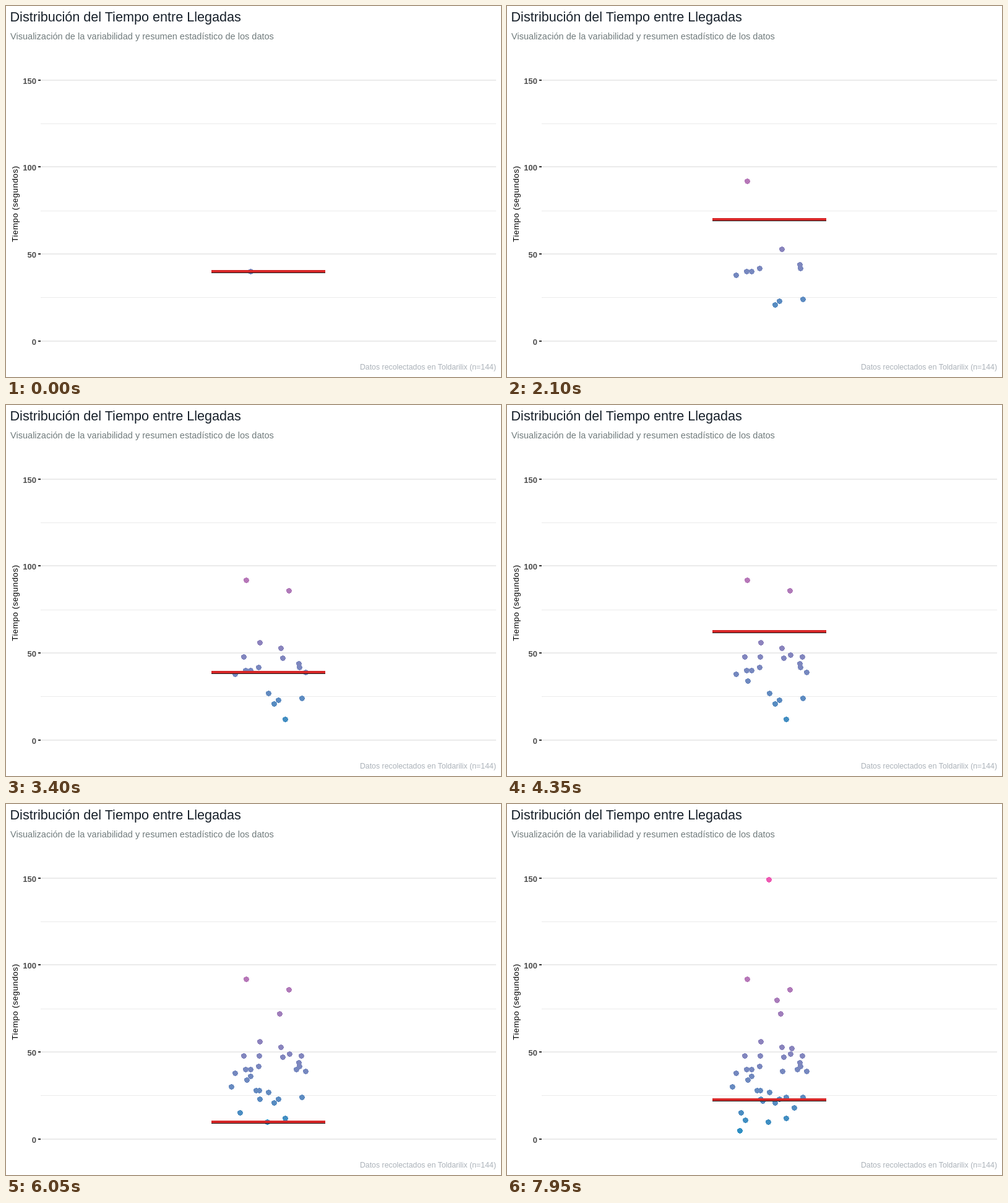
An HTML page for the animation above (8000 ms loop, 800 by 600 pixels).

```html
<!DOCTYPE html>
<html lang="es">
<head>
<meta charset="utf-8">
<title>Distribución del Tiempo entre Llegadas</title>
<style>
  html, body { margin: 0; width: 100%; height: 100%; overflow: hidden; background: #fff; }
  svg { display: block; width: 800px; height: 600px; font-family: "Liberation Sans", Arial, sans-serif; }
  rect, circle { shape-rendering: crispEdges; }
  .title { font-size: 21.6px; fill: #17202a; }
  .subtitle { font-size: 14.55px; fill: #707b7c; }
  .caption { font-size: 12.33px; fill: #abb2b9; text-anchor: end; }
  .axis { font-size: 13.4px; letter-spacing: .5px; text-anchor: middle; }
  .tick { font-size: 13px; font-weight: bold; fill: #4d4d4d; text-anchor: end; }
</style>
</head>
<body>
<svg viewBox="0 0 800 600">
  <text class="title" x="6.5" y="25">Distribución del Tiempo entre Llegadas</text>
  <text class="subtitle" x="7" y="54">Visualización de la variabilidad y resumen estadístico de los datos</text>
  <text class="caption" x="792" y="588">Datos recolectados en Toldarilix (n=144)</text>
  <text class="axis" transform="translate(19 320) rotate(-90)">Tiempo (segundos)</text>
  <g id="grid"></g>
  <g id="dots"></g>
  <g id="bar">
    <rect x="332" y="-2" width="184" height="4" fill="#d62728"/>
    <rect x="332" y="2" width="184" height="1" fill="#1c1c1c"/>
  </g>
</svg>
<script>
const FRAME_MS = 50, FRAMES = 160;
const FRAMES_PER_ARRIVAL = 575 / 143;

// Seconds between arrivals: the key points the bar travels through
const seconds = [40, 42, 21, 42, 40, 44, 24, 53, 23, 38, 92, 48, 47, 56, 86, 27, 12, 39, 48, 49, 48,
  34, 72, 15, 36, 23, 30, 28, 40, 28, 10, 80, 149, 11, 18, 39, 52, 5, 24, 22, 23];

const byId = id => document.getElementById(id);
const yOf = value => Math.round(541.68 - 2.8138 * value);
const arrivalFrame = i => Math.round(i * FRAMES_PER_ARRIVAL);

// Mersenne Twister, seeded the way R does it; only its first outputs are needed
function seededRandom(seed) {
  const next = () => seed = (Math.imul(69069, seed) + 1) >>> 0;
  for (let i = 0; i < 51; i++) next();
  const state = Array.from({ length: 624 }, next);
  return i => {
    const bits = (state[i] & 0x80000000) | (state[i + 1] & 0x7fffffff);
    let y = state[i + 397] ^ (bits >>> 1) ^ (bits & 1 ? 0x9908b0df : 0);
    y ^= y >>> 11;
    y ^= (y << 7) & 0x9d2c5680;
    y ^= (y << 15) & 0xefc60000;
    y ^= y >>> 18;
    return (y >>> 0) / 2 ** 32;
  };
}

function add(parent, tag, attrs, text = "") {
  const node = document.createElementNS("http://www.w3.org/2000/svg", tag);
  for (const name in attrs) node.setAttribute(name, attrs[name]);
  node.textContent = text;
  return parent.appendChild(node);
}

for (let value = 0; value <= 150; value += 25) {
  const y = yOf(value), major = value % 50 === 0;
  add(byId("grid"), "rect", { x: 56, y: major ? y - 1 : y, width: 736, height: major ? 2 : 1, fill: "#ebebeb" });
  if (!major) continue;
  add(byId("grid"), "rect", { x: 52, y: y - 1, width: 4, height: 2, fill: "#333" });
  add(byId("grid"), "text", { class: "tick", x: 49, y: y + 6 }, value);
}

const random = seededRandom(1);
const [min, max] = [Math.min(...seconds), Math.max(...seconds)];
const dots = seconds.map((value, i) => {
  const share = (value - min) / (max - min) * 100;
  return add(byId("dots"), "circle", {
    cx: Math.round(362.53 + 122.67 * random(i)) + .5,
    cy: yOf(value) + .5,
    r: 4.5,
    style: `fill: color-mix(in lab, #ee58b2 ${share}%, #2e8fc3)`
  });
});

function draw(frame) {
  dots.forEach((dot, i) => dot.setAttribute("visibility", arrivalFrame(i) <= frame ? "visible" : "hidden"));
  const last = seconds.findLastIndex((_, i) => arrivalFrame(i) <= frame);
  const from = arrivalFrame(last), to = arrivalFrame(last + 1);
  const value = seconds[last] + (seconds[last + 1] - seconds[last]) * (frame - from) / (to - from);
  byId("bar").setAttribute("transform", `translate(0 ${yOf(value)})`);
}

const start = performance.now();
function tick() {
  draw(Math.floor((performance.now() - start) / FRAME_MS) % FRAMES);
  requestAnimationFrame(tick);
}
tick();
</script>
</body>
</html>
```
